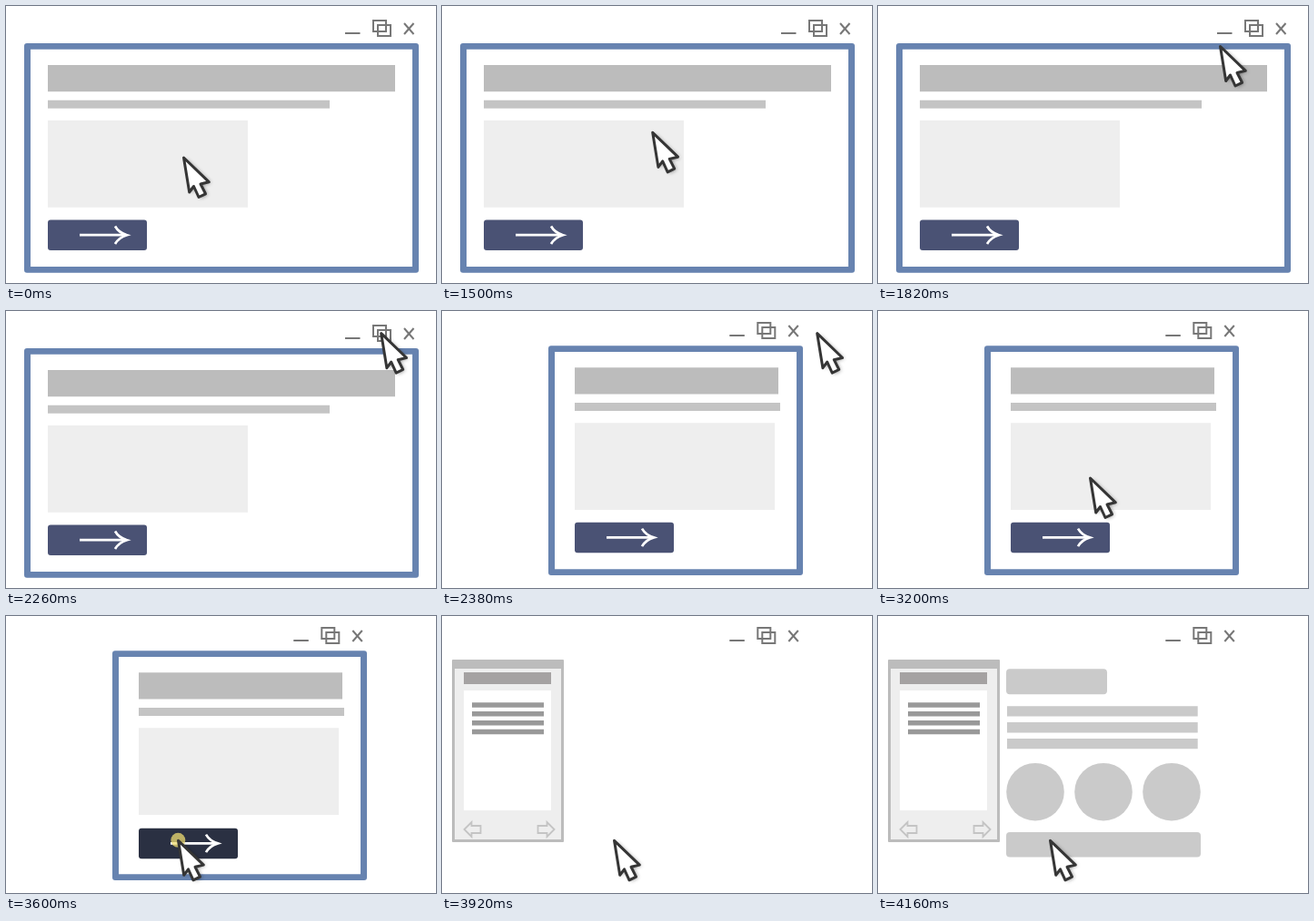
Animation of 473 by 305 pixels, one loop 5.66 s. Source, as an HTML page with a canvas:

```html
<!DOCTYPE html>
<html lang="en">
<head>
<meta charset="utf-8">
<title>Window demo</title>
<style>
html, body { margin: 0; width: 100%; height: 100%; overflow: hidden; background: #fff; }
canvas { display: block; width: 473px; height: 305px; }
</style>
</head>
<body>
<canvas id="stage"></canvas>
<script>
const W = 473, H = 305, LOOP = 5660;
const canvas = document.getElementById('stage');
const ctx = canvas.getContext('2d');
const dpr = window.devicePixelRatio || 1;
canvas.width = W * dpr;
canvas.height = H * dpr;

// Index of the last start time reached, or -1.
const stepAt = (t, times) => times.filter(s => s <= t).length - 1;

function box(x1, y1, x2, y2, color, r = 0) {
  ctx.fillStyle = color;
  ctx.beginPath();
  ctx.roundRect(x1, y1, x2 - x1, y2 - y1, r);
  ctx.fill();
}

function disc(x, y, r, color) {
  ctx.fillStyle = color;
  ctx.beginPath();
  ctx.arc(x, y, r, 0, Math.PI * 2);
  ctx.fill();
}

function poly(points, close) {
  ctx.beginPath();
  points.forEach(([x, y]) => ctx.lineTo(x, y));
  if (close) ctx.closePath();
}

function line(points, color, width, close = false) {
  ctx.strokeStyle = color;
  ctx.lineWidth = width;
  poly(points, close);
  ctx.stroke();
}

function controls(dx, dy) {
  const grey = '#777';
  ctx.save();
  ctx.translate(dx, dy);
  line([[373, 30], [389.5, 30]], grey, 2);
  ctx.strokeRect(404, 16, 14, 12);
  ctx.strokeRect(409, 21, 14, 12);
  line([[438, 19], [448.5, 31]], grey, 2);
  line([[448.5, 19], [438, 31]], grey, 2);
  ctx.restore();
}

function button(x, y, color) {
  box(x, y, x + 109, y + 33.5, color, 3);
  ctx.save();
  ctx.translate(x, y);
  line([[35, 16.7], [86, 16.7]], '#fff', 2.7);
  ctx.beginPath();
  ctx.moveTo(74, 7);
  ctx.quadraticCurveTo(78, 14, 87, 16.7);
  ctx.quadraticCurveTo(78, 19.4, 74, 26.5);
  ctx.stroke();
  ctx.restore();
}

function page(small, btnColor, press) {
  const [l, r, dx, dy] = small ? [117, 397, 100, -2.8] : [20, 454, 0, 0];
  box(l, 41 + dy, r, 293.7 + dy, '#6783b0', 3);
  box(l + 7, 47.8 + dy, r - 7, 287 + dy, '#fff');
  const x = 46 + dx;
  box(x, 65 + dy, small ? 370 : 428, 94.3 + dy, '#bcbcbc');
  box(x, 103.8 + dy, small ? 372 : 356, 112.7 + dy, '#c4c4c4');
  box(x, 126 + dy, x + 220, 221.8 + dy, '#eee');
  button(x, 235.5 + dy + press, btnColor);
}

function panel() {
  box(11, 48, 134, 249, '#bcbcbc', 1);
  box(14, 58, 131, 246, '#eee');
  box(24, 62, 120, 75, '#a5a2a2');
  box(24, 82, 120, 214, '#fff');
  for (let i = 0; i < 4; i++) box(33, 95.3 + i * 9.8, 112, 100.8 + i * 9.8, '#999');
  const arrow = [[0, 8], [8, 0], [8, 4], [18, 4], [18, 12], [8, 12], [8, 16]];
  line(arrow.map(([x, y]) => [24.5 + x, 227 + y]), '#c4c4c4', 1.8, true);
  line(arrow.map(([x, y]) => [123.5 - x, 227 + y]), '#c4c4c4', 1.8, true);
}

function content(dy) {
  const grey = '#cacaca';
  ctx.save();
  ctx.translate(0, dy);
  box(141, 58.3, 252, 86.3, grey, 4);
  for (let i = 0; i < 3; i++) box(142, 99.3 + i * 17.8, 351.7, 110.6 + i * 17.8, grey);
  for (let i = 0; i < 3; i++) disc(173 + i * 75, 193.7, 31.8, grey);
  box(141, 238, 355, 265.6, grey, 4);
  ctx.restore();
}

function cursor(x, y) {
  ctx.save();
  ctx.translate(x, y);
  ctx.lineJoin = 'round';
  poly([[1, 1.5], [7.2, 39.5], [12, 33], [17.5, 45], [25, 41.3], [19.5, 30.5], [28.8, 28.3]], true);
  ctx.shadowColor = 'rgba(0,0,0,.45)';
  ctx.shadowBlur = 4 * dpr;
  ctx.shadowOffsetX = 2 * dpr;
  ctx.shadowOffsetY = dpr;
  ctx.fillStyle = '#fff';
  ctx.fill();
  ctx.shadowColor = 'transparent';
  ctx.strokeStyle = '#353535';
  ctx.lineWidth = 3;
  ctx.stroke();
  ctx.restore();
}

function cursorPos(t) {
  if (t < 2880) {
    const n = stepAt(t, [1500, 1580, 1660, 1740, 1820, 1900]) + 1;
    return [194.5 + 36.2 * n, 165.5 - 28.4 * n + 0.78 * n * n];
  }
  if (t < 3200) {
    const n = stepAt(t, [2880, 3000, 3040, 3080, 3120, 3160]);
    return [353.5 - 20.2 * n, 68 + 18 * n + 0.2 * n * n];
  }
  return [[232.5, 182.5], [216, 204], [201, 226], [188.5, 245.8]][stepAt(t, [3200, 3240, 3280, 3360])];
}

function ripple(t, x, y) {
  const radius = (from, mid, end) => t < from || t >= end ? 0 : t < mid ? 20 : 8;
  const r = radius(2020, 2140, 2260) || radius(3520, 3600, 3680);
  if (r) disc(x + 0.8, y + 1, r, r > 8 ? 'rgba(240,220,110,.4)' : 'rgba(240,222,115,.75)');
}

function draw(t) {
  ctx.setTransform(dpr, 0, 0, dpr, 0, 0);
  ctx.fillStyle = '#fff';
  ctx.fillRect(0, 0, W, H);

  const small = t >= 2380;
  controls(small ? -56.7 : 0, small ? -3 : 0);
  if (t < 3920) {
    ctx.globalAlpha = t < 3800 ? 1 : 0.5;
    page(small, t < 3440 ? '#4a5274' : '#2a3042', t < 3520 ? 0 : 1);
    ctx.globalAlpha = 1;
  } else {
    panel();
    if (t >= 4040) content(t < 4160 ? 21 : 0);
  }

  const [x, y] = cursorPos(t);
  ripple(t, x, y);
  cursor(x, y);
}

const start = performance.now();
function tick() {
  draw((performance.now() - start) % LOOP);
  requestAnimationFrame(tick);
}
tick();
</script>
</body>
</html>
```
